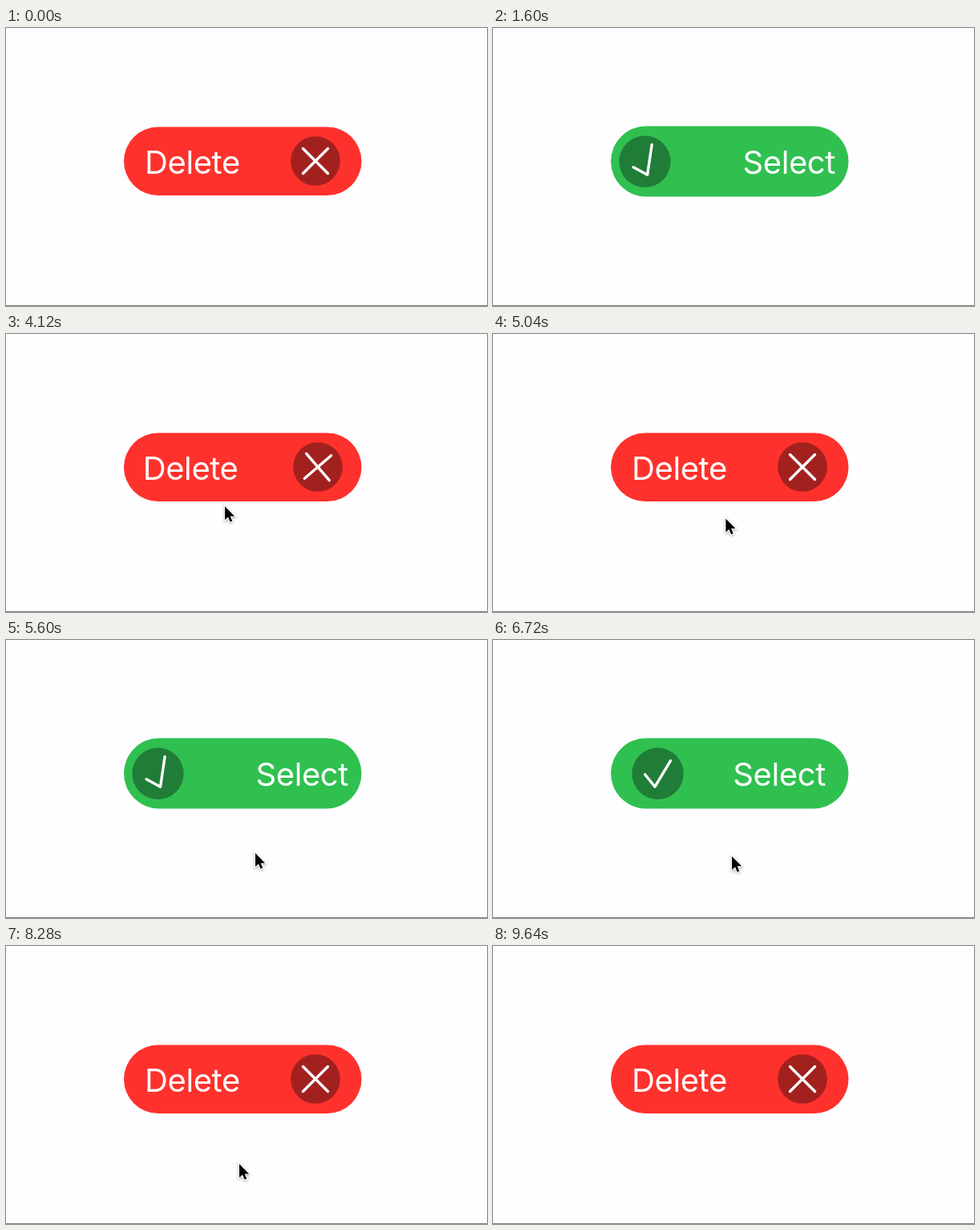
An HTML page with a canvas for the animation above (9680 ms loop, 600 px wide and 347 px high).

```html
<!DOCTYPE html>
<html lang="en">
<head>
<meta charset="utf-8">
<title>Toggle button</title>
<style>
  html, body { margin: 0; height: 100%; overflow: hidden; background: #fefdff; }
  canvas { display: block; }
</style>
</head>
<body>
<canvas id="stage" width="600" height="347"></canvas>
<script>
const ctx = document.getElementById('stage').getContext('2d');
const LOOP = 9680, SWING = 1000, REACH = 16.3;
const toggles = [1160, 3180, 5160, 7160];

const cross = new Path2D('M-15.5-15.5 15.5 15.5M15.5-15.5-15.5 15.5');
const tick = new Path2D('M-16 1-3.5 16.5 16-16');
const arrow = new Path2D('M0 0V17L4 13.4 6.6 19.6 9.3 18.5 6.7 12.4H12.2Z');

const remove = {
  label: 'Delete', textX: 173, icon: cross, x: 386, y: 166, r: 30.8, side: 1,
  top: 123.5, height: 85.5, fill: '#ff312c', disc: '#a2211e'
};
const select = {
  label: 'Select', textX: 299.3, icon: tick, x: 205.5, y: 166.7, r: 32.2, side: -1,
  top: 122.5, height: 88, fill: '#30c050', disc: '#207d37'
};

// Pointer waypoints: time, x, y
const pointer = [
  [2100, 300, 348], [2900, 280, 180], [3200, 280, 180], [4120, 272, 214],
  [5160, 290, 230], [5600, 310, 265], [6300, 310, 265], [7000, 290, 271],
  [8300, 290, 271], [8900, 103, 306]
];

function drawButton(b, swing) {
  const shift = b.side * REACH * swing;
  ctx.fillStyle = b.fill;
  ctx.beginPath();
  ctx.roundRect(147, b.top, 296.5, b.height, b.height / 2);
  ctx.fill();

  ctx.fillStyle = '#fff';
  ctx.font = '400 40px Inter, sans-serif';
  ctx.letterSpacing = '-0.4px';
  ctx.fillText(b.label, b.textX - shift * 0.76, 181.6);

  ctx.save();
  ctx.translate(b.x + shift, b.y);
  ctx.fillStyle = b.disc;
  ctx.beginPath();
  ctx.arc(0, 0, b.r, 0, Math.PI * 2);
  ctx.fill();
  ctx.rotate(b.side * swing * 0.4);
  ctx.strokeStyle = '#fff';
  ctx.lineWidth = 3.4;
  ctx.lineCap = ctx.lineJoin = 'round';
  ctx.stroke(b.icon);
  ctx.restore();
}

function drawPointer(time) {
  const next = pointer.findIndex(p => p[0] > time);
  if (next < 1) return;
  const [t0, x0, y0] = pointer[next - 1], [t1, x1, y1] = pointer[next];
  const k = (time - t0) / (t1 - t0), e = k * k * (3 - 2 * k);
  ctx.save();
  ctx.translate(x0 + (x1 - x0) * e + 1, y0 + (y1 - y0) * e + 1);
  ctx.shadowColor = 'rgba(0,0,0,.35)';
  ctx.shadowBlur = 3;
  ctx.shadowOffsetY = 1;
  ctx.strokeStyle = '#fff';
  ctx.lineWidth = 2.4;
  ctx.stroke(arrow);
  ctx.shadowColor = 'transparent';
  ctx.fillStyle = '#000';
  ctx.fill(arrow);
  ctx.restore();
}

function draw() {
  const time = performance.now() % LOOP;
  const past = toggles.filter(t => t <= time);
  const age = past.length ? time - past.at(-1) : SWING;
  const swing = age < SWING ? Math.sin(Math.PI * age / SWING) : 0;

  ctx.fillStyle = '#fefdff';
  ctx.fillRect(0, 0, 600, 347);
  ctx.fillStyle = '#7c7b7d';
  ctx.fillRect(0, 346, 600, 1);
  drawButton(past.length % 2 ? select : remove, swing);
  drawPointer(time);
  requestAnimationFrame(draw);
}
draw();
</script>
</body>
</html>
```
